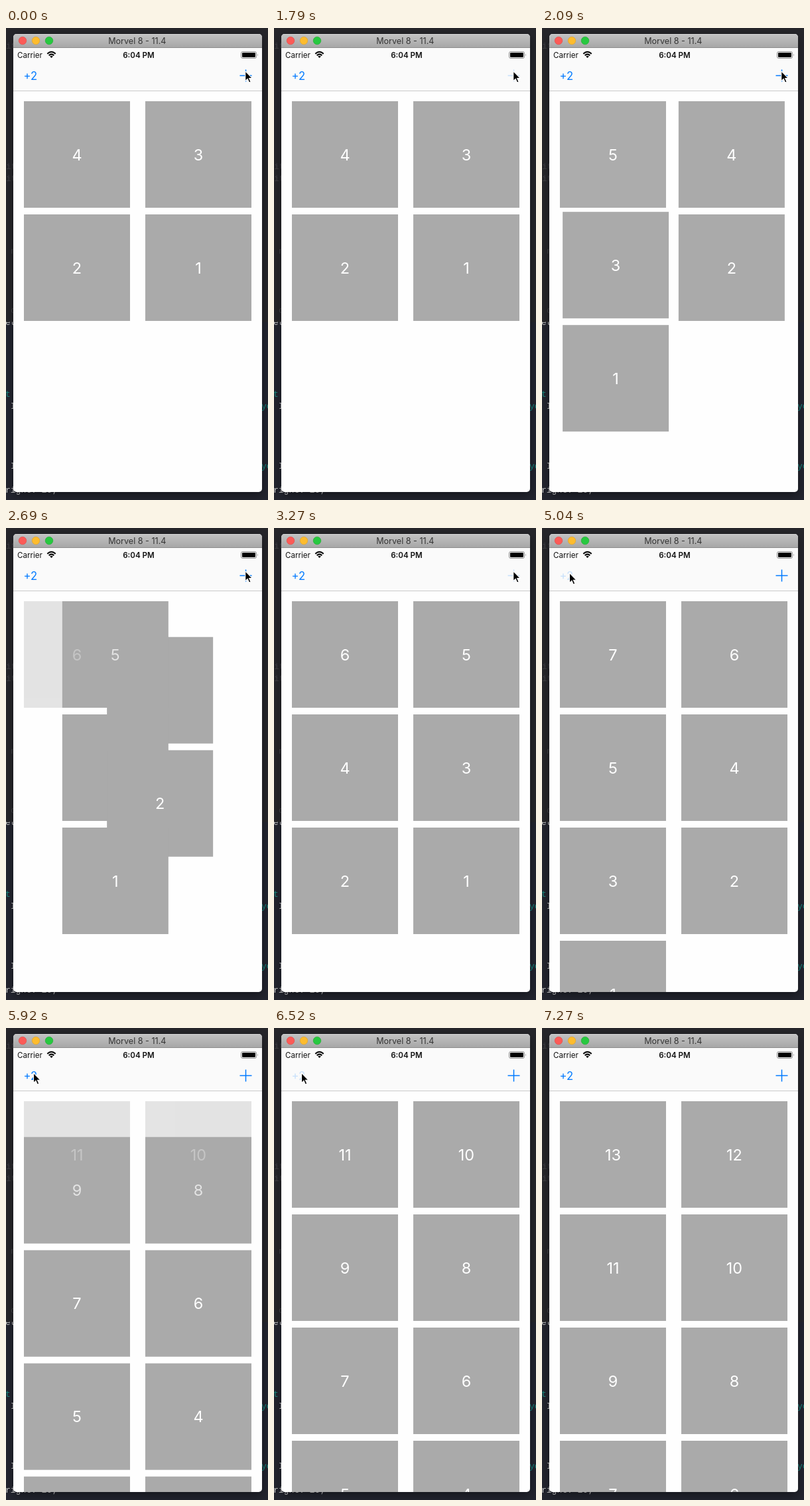
An HTML page that plays this animation: 395 px wide and 709 px high, repeating every 7720 ms.

```html
<!DOCTYPE html>
<html lang="en">
<head>
<meta charset="utf-8">
<title>Grid inserts</title>
<style>
  html, body { margin: 0; width: 100%; height: 100%; overflow: hidden; background: #1f2027; }
  svg { display: block; width: 395px; height: 709px; }
  text { font-family: Inter, Roboto, "Liberation Sans", sans-serif; }
  .code text { font: 13px "Liberation Mono", "DejaVu Sans Mono", monospace; white-space: pre; }
  .cell text { font-size: 23.5px; fill: #fff; text-anchor: middle; }
</style>
</head>
<body>
<svg viewBox="0 0 395 709" xmlns="http://www.w3.org/2000/svg">
  <defs>
    <linearGradient id="title" x2="0" y2="1">
      <stop stop-color="#c2c2c2"/><stop offset="1" stop-color="#a6a6a6"/>
    </linearGradient>
    <clipPath id="frame"><rect x="11" y="9" width="375" height="688" rx="5"/></clipPath>
    <filter id="blur" x="-20%" y="-20%" width="140%" height="140%"><feGaussianBlur stdDeviation="7"/></filter>
  </defs>

  <rect width="395" height="709" fill="#26262a"/>
  <rect y="442" width="395" height="267" fill="#23252f"/>
  <g class="code" id="code"></g>
  <rect x="11" y="14" width="375" height="688" rx="5" opacity=".4" filter="url(#blur)"/>

  <g clip-path="url(#frame)">
    <rect x="11" y="9" width="375" height="688" fill="#fefefe"/>
    <rect x="11" y="30" width="375" height="64" fill="#fafafa"/>
    <rect x="11" y="94" width="375" height="1" fill="#cbcbcb"/>
    <rect x="11" y="9" width="375" height="21" fill="url(#title)"/>
    <rect x="11" y="9" width="375" height="1" fill="#d8d8d8"/>
    <rect x="11" y="29" width="375" height="1" fill="#8c8c8c"/>
    <g stroke-width=".6">
      <circle cx="25" cy="19" r="5.8" fill="#fc5b57" stroke="#df4744"/>
      <circle cx="45" cy="19" r="5.8" fill="#fdbc2e" stroke="#de9f27"/>
      <circle cx="65" cy="19" r="5.8" fill="#28c840" stroke="#1aab2c"/>
    </g>
    <text x="197.8" y="24" font-size="12.6" fill="#333" text-anchor="middle">Morvel 8 - 11.4</text>

    <text x="17" y="44.8" font-size="11.6" fill="#111">Carrier</text>
    <g fill="none" stroke="#000" stroke-width="2">
      <path d="M62.3 38.7Q68.5 32.7 74.7 38.7M64.7 41.3Q68.5 37.5 72.3 41.3"/>
      <path d="M66.2 42.7Q68.5 40.6 70.8 42.7L68.5 45Z" fill="#000" stroke="none"/>
    </g>
    <text x="200" y="44.6" font-size="11.6" font-weight="600" fill="#111" text-anchor="middle">6:04 PM</text>
    <rect x="354.5" y="35.5" width="23" height="10" rx="2.4" fill="none" stroke="#8e8e8e"/>
    <rect x="356" y="37" width="20" height="7" rx="1.2"/>
    <path d="M379 38.8q1.6 1.7 0 3.4z" fill="#8e8e8e"/>

    <text id="two" x="26.5" y="78" font-size="16.6" fill="#007aff">+2</text>
    <path id="plus" d="M352.5 71.5H370.5M361.5 62.5V80.5" stroke="#007aff" stroke-width="1.5"/>
    <g id="cells"></g>
    <path id="cursor" d="M0 0V14.8L3.4 11.7L5.8 17.2L8.3 16.1L5.9 10.8H10.5Z" stroke="#fff" stroke-width="1.1"/>
  </g>
</svg>
<script>
const LOOP = 7720, PRESS = 32, MOVE = 300, FIRST = 4;
const $ = id => document.getElementById(id);

// Screen refreshes: first time, last time, number of refreshes
const bursts = [[1790, 2240, 4], [2690, 2980, 3], [3270, 3720, 4], [4020, 4600, 5],
  [5040, 5480, 4], [5770, 6220, 4], [6520, 7270, 6]];
// Insertions: start time, number of new cells
const inserts = [[1822, 1], [2573, 1], [3302, 1], [5072, 2], [5803, 2], [6552, 2]];

function add(parent, tag, attrs, text) {
  const el = document.createElementNS('http://www.w3.org/2000/svg', tag);
  for (const key in attrs) el.setAttribute(key, attrs[key]);
  if (text) el.textContent = text;
  return parent.appendChild(el);
}

[[0, 31, 'it', '#414145'], [0, 212, 'it', '#414145'], [0, 230, 'it', '#414145'],
 [7, 339, 'n', '#414145'], [7, 428, 'c', '#414145'], [-1, 446, 'et', '#c9c9c9'],
 [-1, 554, 't', '#168b80'], [7, 572, 'I', '#d4d4d4'], [7, 662, 'I', '#d4d4d4'],
 [385, 572, 'yo', '#168b80'], [385, 662, 'yo', '#168b80'], [-1, 698, 'right: 10;', '#d4d4d4']
].forEach(([x, y, s, fill]) => add($('code'), 'text', { x, y, fill }, s));
add($('code'), 'rect', { y: 434, width: 395, height: 7.5, fill: '#26262a' });

// Stacking follows creation order
const cells = [4, 3, 2, 1, 5, 6, 7, 8, 9, 10, 11, 12, 13].map(n => {
  const el = add($('cells'), 'g', { class: 'cell' });
  add(el, 'rect', { width: 160, height: 160, fill: '#aaa' });
  add(el, 'text', { x: 80, y: 88.6 }, String(n));
  return { n, el };
});

const clamp = v => Math.max(0, Math.min(1, v));
const mix = (a, b, p) => a + (b - a) * p;
const smooth = p => p * p * (3 - 2 * p);

// cubic-bezier(.42, 0, .58, 1)
function ease(x) {
  if (x <= 0 || x >= 1) return clamp(x);
  let lo = 0, hi = 1, u;
  for (let i = 0; i < 24; i++) {
    u = (lo + hi) / 2;
    const v = 1 - u;
    if (1.26 * v * v * u + 1.74 * v * u * u + u ** 3 < x) lo = u; else hi = u;
  }
  return u * u * (3 - 2 * u);
}

function refreshed(t) {
  let shown = 0;
  for (const [a, b, n] of bursts) {
    if (t < a) break;
    const step = (b - a) / (n - 1);
    shown = a + Math.min(n - 1, Math.floor((t - a) / step + 1e-6)) * step;
  }
  return shown;
}

const slot = i => [27 + 183 * (i % 2), 110 + 170 * Math.floor(i / 2)];

function drawCells(t) {
  let before = FIRST, after = FIRST, p = 1;
  for (const [start, count] of inserts) {
    if (t < start) break;
    before = after;
    after += count;
    p = ease((t - start) / MOVE);
  }
  for (const { n, el } of cells) {
    const fresh = n > before;
    const to = slot(Math.max(0, after - n));
    const from = fresh ? to : slot(before - n);
    el.setAttribute('transform', `translate(${mix(from[0], to[0], p)} ${mix(from[1], to[1], p)})`);
    el.setAttribute('opacity', n > after ? 0 : fresh ? p : 1);
  }
}

function drawButtons(t) {
  const alpha = { 1: 1, 2: 1 };
  for (const [start, count] of inserts) {
    if (t >= start - PRESS) alpha[count] = mix(.2, 1, clamp((t - start) / 110));
  }
  $('plus').setAttribute('opacity', alpha[1]);
  $('two').setAttribute('opacity', alpha[2]);
}

function drawCursor(t) {
  const p = smooth(clamp((t - 3890) / 710));
  const out = smooth(clamp((t - 6970) / 300));
  const x = mix(mix(360.8, 41.5, p), 345, out);
  const y = mix(mix(64.8, 67.5, p), 690, out);
  $('cursor').setAttribute('transform', `translate(${x} ${y})`);
  $('cursor').setAttribute('opacity', out < 1 ? 1 : 0);
}

function draw(ms) {
  const t = refreshed(ms % LOOP);
  drawCells(t);
  drawButtons(t);
  drawCursor(t);
}

const begin = performance.now();
function tick() {
  draw(performance.now() - begin);
  requestAnimationFrame(tick);
}
tick();
</script>
</body>
</html>
```
